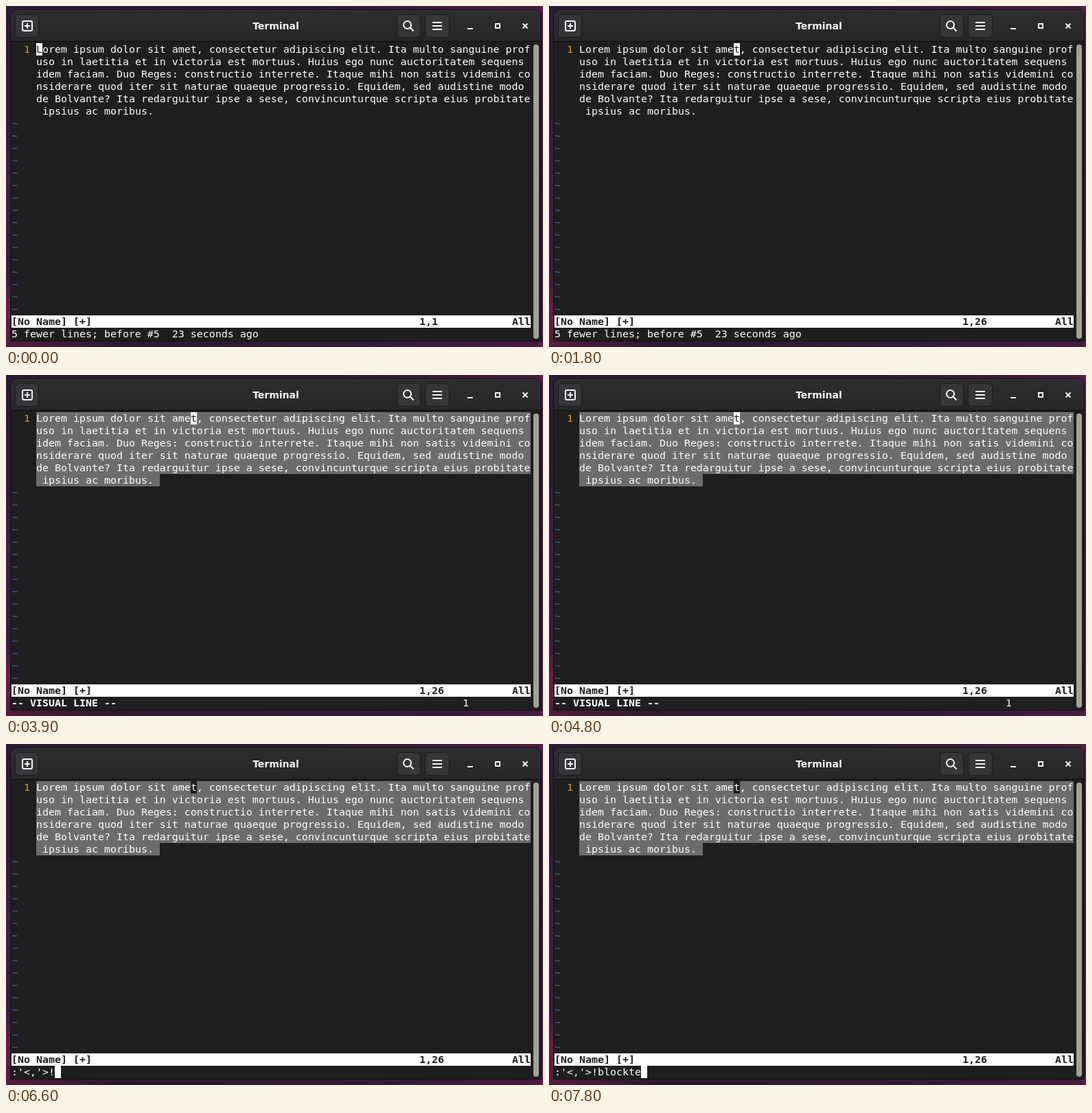
These frames come from a looping animation (782 px wide and 496 px high, 8 s). An HTML page:

```html
<!DOCTYPE html>
<html lang="en">
<head>
<meta charset="utf-8">
<title>Terminal</title>
<style>
  html, body { margin: 0; width: 100%; height: 100%; overflow: hidden; }
  #stage {
    position: relative; width: 782px; height: 496px; overflow: hidden;
    background:
      linear-gradient(90deg, #0000 60%, #5a1a4480 85%, #6a1b4880) 0 0 / 100% 8px no-repeat,
      linear-gradient(#2c1a38 0, #2e1b3a 30%, #44204a 50%, #3a1b3e 78%, #6e1c48 88%, #561a40) 0 0 / 8px 100% no-repeat,
      linear-gradient(#541a42, #3a1a3c 50%, #5c1b44) 100% 0 / 5px 100% no-repeat,
      linear-gradient(90deg, #561a40, #2c1932 20%, #321a38 70%, #4a1a40) 0 100% / 100% 9px no-repeat,
      #2c1a36;
  }
  #win {
    position: absolute; left: 7px; top: 6px; width: 772px; height: 481px;
    border-radius: 9px 9px 0 0; background: #1e1e1e; box-shadow: 0 0 0 1px #101012;
  }
  #bar {
    height: 46px; border-radius: 9px 9px 0 0; box-sizing: border-box;
    background: linear-gradient(#2d2d30, #272729);
    border-top: 1px solid #3a3a3c; border-bottom: 1px solid #0c0c0c;
  }
  #stage svg { position: absolute; left: 0; top: 0; }
  #thumb {
    position: absolute; left: 768px; top: 56px; width: 8px; height: 428px;
    border-radius: 4px; background: #a2a298;
  }
  #term span {
    position: absolute; height: 18px; white-space: pre; color: #fff;
    font: 14.95px/18px "DejaVu Sans Mono", monospace;
  }
  #term .bold { font-weight: bold; }
  #term .dark { color: #1e1e1e; }
</style>
</head>
<body>
<div id="stage">
  <div id="win"><div id="bar"></div></div>
  <svg width="782" height="54" fill="none" stroke="#f4f4f4" stroke-width="2">
    <g fill="#363638" stroke="#1b1b1d" stroke-width="1">
      <rect x="13.5" y="12.5" width="34" height="33" rx="5"/>
      <rect x="569.5" y="12.5" width="34" height="33" rx="5"/>
      <rect x="610.5" y="12.5" width="35" height="33" rx="5"/>
    </g>
    <rect x="24" y="22" width="14" height="14" rx="2"/>
    <path d="M27 29h8M31 25v8"/>
    <circle cx="584.5" cy="27.5" r="5.5"/>
    <path d="M588.5 31.5l5 5M621 24h14M621 29h14M621 34h14M672 33h8"/>
    <rect x="713" y="26" width="6" height="6"/>
    <path d="M752.5 25.500l7 7M759.500 25.500l-7 7"/>
    <text x="393" y="34" text-anchor="middle" fill="#f4f4f4" stroke="none"
      font-family="DejaVu Sans, sans-serif" font-size="14" font-weight="bold">Terminal</text>
  </svg>
  <div id="thumb"></div>
  <div id="term"></div>
</div>
<script>
const term = document.getElementById('term');
const CELL = 9, ROW = 18, LEFT = 8, TOP = 54, DARK = '#1e1e1e', GRAY = '#6c6c6c';
const LOOP = 8000;

const lines = [
  'Lorem ipsum dolor sit amet, consectetur adipiscing elit. Ita multo sanguine prof',
  'uso in laetitia et in victoria est mortuus. Huius ego nunc auctoritatem sequens ',
  'idem faciam. Duo Reges: constructio interrete. Itaque mihi non satis videmini co',
  'nsiderare quod iter sit naturae quaeque progressio. Equidem, sed audistine modo ',
  'de Bolvante? Ita redarguitur ipse a sese, convincunturque scripta eius probitate',
  ' ipsius ac moribus. '
];
const command = ":'<,'>!blockte";
const moves = [[0, 1], [800, 21], [1100, 26]];
const typed = [[5300, 6], [6600, 7], [6700, 8], [6900, 9], [7000, 10],
               [7200, 11], [7500, 12], [7700, 13], [7800, 14]];

// Last value whose start time has passed
const at = (steps, t) => steps.reduce((v, [start, next]) => t >= start ? next : v, 0);

function moveTo(el, col, row) {
  el.style.left = LEFT + col * CELL + 'px';
  el.style.top = TOP + row * ROW + 'px';
}

function put(col, row, text = '', cls = '') {
  const el = document.createElement('span');
  el.textContent = text;
  el.className = cls;
  moveTo(el, col, row);
  term.append(el);
  return el;
}

function block(col, row, cells, color) {
  const el = put(col, row);
  el.style.width = cells * CELL + 'px';
  el.style.background = color;
  return el;
}

const selection = lines.map((line, i) => block(4, i, line.length, GRAY));
put(2, 0, '1').style.color = '#d8a01a';
lines.forEach((line, i) => put(4, i, line));
for (let row = 6; row < 22; row++) put(0, row, '~').style.color = '#2a6fc0';
block(0, 22, 84, '#fff');
put(0, 22, '[No Name] [+]', 'bold dark');
put(81, 22, 'All', 'bold dark');
const ruler = put(66, 22, '', 'bold dark');
const message = put(0, 23);
const count = put(73, 23, '1');
const cursor = block(4, 0, 1, '#fff');
const caret = block(0, 23, 1, '#fff');

function render(t) {
  const col = at(moves, t), length = at(typed, t);
  const visual = t >= 3900, typing = length > 0;

  selection.forEach(el => el.hidden = !visual);
  selection.forEach(el => el.style.visibility = visual ? 'visible' : 'hidden');
  ruler.textContent = '1,' + col;
  message.textContent = typing ? command.slice(0, length)
    : visual ? '-- VISUAL LINE --' : '5 fewer lines; before #5  23 seconds ago';
  message.className = visual && !typing ? 'bold' : '';
  count.style.visibility = visual && !typing ? 'visible' : 'hidden';

  moveTo(cursor, 3 + col, 0);
  cursor.textContent = lines[0][col - 1];
  cursor.style.background = typing ? DARK : '#fff';
  cursor.style.color = typing ? '#fff' : DARK;
  moveTo(caret, length, 23);
  caret.style.visibility = typing ? 'visible' : 'hidden';
}

const began = performance.now();
function tick() {
  render((performance.now() - began) % LOOP);
  requestAnimationFrame(tick);
}
tick();
</script>
</body>
</html>
```
